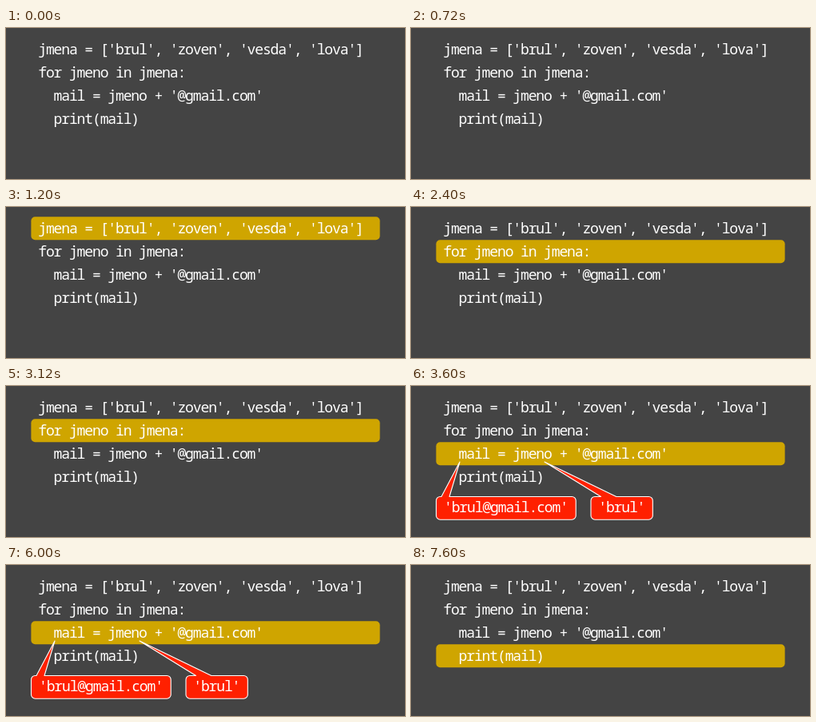
Write an HTML page with a canvas that moves like this. It is 499 px wide and 189 px high and loops after 8 s.

```html
<!DOCTYPE html>
<html lang="cs">
<head>
<meta charset="utf-8">
<title>Cyklus for</title>
<style>
html, body { margin: 0; width: 100%; height: 100%; overflow: hidden; background: #444; }
canvas { display: block; }
</style>
</head>
<body>
<canvas id="stage" width="499" height="189"></canvas>
<script>
const ctx = document.getElementById('stage').getContext('2d');
const LOOP = 8000;
const LINE = 29;      // line height
const PITCH = 9.68;   // width of one character cell
const LEFT = 40.2;

const code = [
  "jmena = ['brul', 'zoven', 'vesda', 'lova']",
  "for jmeno in jmena:",
  "  mail = jmeno + '@gmail.com'",
  "  print(mail)"
];

// start time of each step and the code line it marks
const steps = [
  { at: 0, line: -1 },
  { at: 1200, line: 0 },
  { at: 2400, line: 1 },
  { at: 3600, line: 2, values: true },
  { at: 7600, line: 3 }
];

function write(text, x, y) {
  ctx.fillStyle = '#fff';
  ctx.fillText(text, x, y);
}

function mark(line) {
  ctx.fillStyle = '#cfa500';
  ctx.beginPath();
  ctx.roundRect(31.4, 12.2 + line * LINE, 436.2, LINE, 5);
  ctx.fill();
}

// rounded box whose pointer rises from [a, b] on its top edge to (tx, ty)
function callout(text, x, w, a, b, tx, ty) {
  const top = 138.5, bottom = 167.2, r = 5, right = x + w;
  ctx.beginPath();
  ctx.moveTo(x + r, top);
  ctx.lineTo(a, top);
  ctx.lineTo(tx, ty);
  ctx.lineTo(b, top);
  ctx.arcTo(right, top, right, bottom, r);
  ctx.arcTo(right, bottom, x, bottom, r);
  ctx.arcTo(x, bottom, x, top, r);
  ctx.arcTo(x, top, right, top, r);
  ctx.closePath();
  ctx.fillStyle = '#ff2000';
  ctx.fill();
  ctx.strokeStyle = '#fff';
  ctx.lineWidth = 1.1;
  ctx.lineJoin = 'round';
  ctx.stroke();
  write(text, x + (w - text.length * PITCH) / 2 - 0.4, 158);
}

function setFont() {
  ctx.font = '18px "Noto Sans Mono", "DejaVu Sans Mono", monospace';
  ctx.letterSpacing = '0px';
  ctx.letterSpacing = (PITCH - ctx.measureText('m').width) + 'px';
}

function draw(t) {
  const step = steps.findLast(s => t >= s.at);
  ctx.fillStyle = '#444';
  ctx.fillRect(0, 0, 499, 189);
  setFont();
  if (step.line >= 0) mark(step.line);
  code.forEach((text, i) => write(text, LEFT, 32.6 + i * LINE));
  if (step.values) {
    callout("'brul@gmail.com'", 31.5, 174.7, 38, 48, 61, 95);
    callout("'brul'", 225, 77.3, 237.5, 256.8, 167, 95);
  }
}

const start = performance.now();
function tick() {
  draw((performance.now() - start) % LOOP);
  requestAnimationFrame(tick);
}
tick();
</script>
</body>
</html>
```
